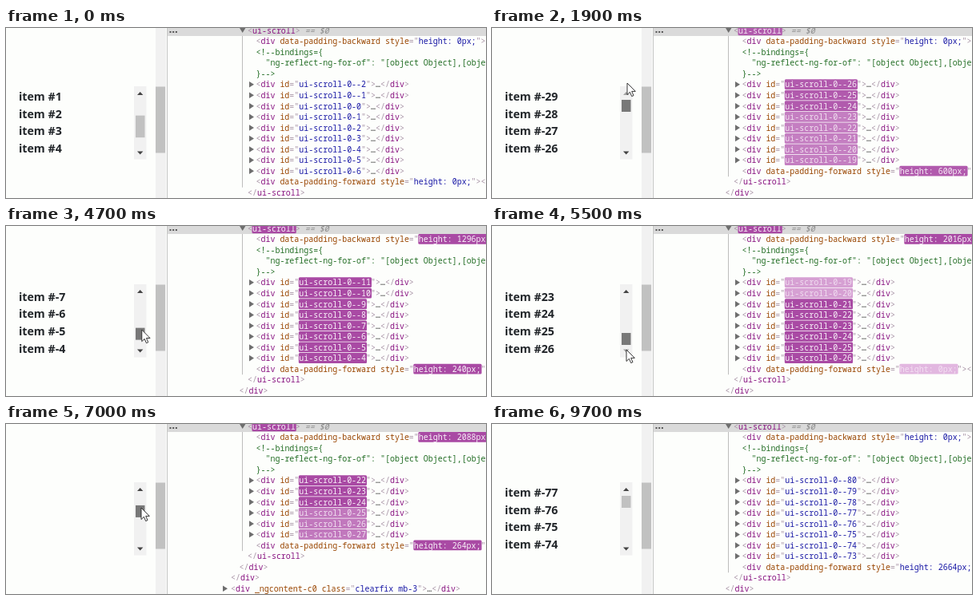
An HTML page for the animation above (10 s loop, 600 by 213 pixels).

```html
<!DOCTYPE html>
<html lang="en">
<head>
<meta charset="utf-8">
<title>Virtual scroll inspector</title>
<style>
  html, body { margin: 0; width: 100%; height: 100%; overflow: hidden; background: #fdfefc; }
  svg { display: block; width: 600px; height: 213px; }
  text { white-space: pre; }
  #items text { font: bold 14.2px "Open Sans", "Noto Sans", sans-serif; fill: #212529; }
  #tree text { font: 9.97px "Noto Sans Mono", "DejaVu Sans Mono", monospace; }
  #tree .hint { font-style: italic; fill: #888; }
</style>
</head>
<body>
<svg viewBox="0 0 600 213" xmlns="http://www.w3.org/2000/svg">
  <rect width="600" height="213" fill="#fdfefc"/>
  <rect x="160" y="73" width="15.5" height="91.5" fill="#f1f1f1"/>
  <rect id="thumb" x="162" width="11.5"/>
  <path id="up" d="M164 84l3.7-4 3.7 4z"/>
  <path id="down" d="M164 154.5h7.4l-3.7 4z"/>
  <g id="items"></g>
  <rect x="187" width="13" height="213" fill="#f1f1f1"/>
  <rect x="187" y="73.5" width="12" height="83" fill="#c1c1c1"/>
  <rect x="201" width="1" height="213" fill="#c4c4c4"/>
  <rect x="202" width="398" height="10" fill="#dadada"/>
  <path d="M204.5 5h10" stroke="#555" stroke-width="2" stroke-dasharray="2 1.7"/>
  <g id="tree"></g>
  <path id="cursor" d="M0 0v14.5l3.4-3.2 2.3 5.3 2.3-1-2.3-5.2h4.6z" fill="#fff" stroke="#222" stroke-width="0.9"/>
</svg>
<script>
const LOOP = 10000, STEP = 100, FADE = 1900;
const CHAR = 5.98, ROW = 13.55, ITEM = 24, VIEW = 4.2;
const TAG = [168, 148, 166], NAME = [136, 18, 128], ATTR = [153, 69, 0],
      VALUE = [26, 26, 166], NOTE = [35, 110, 37], DARK = [48, 48, 48],
      WHITE = [255, 255, 255], HOT = [158, 54, 153], WARM = [245, 219, 244];
const $ = id => document.getElementById(id);
const set = (id, attrs) => Object.entries(attrs).forEach(([k, v]) => $(id).setAttribute(k, v));
const rgb = c => `rgb(${c.map(Math.round)})`;
const mix = (a, b, p) => a.map((v, i) => v + (b[i] - v) * p);
const clamp = v => Math.min(1, Math.max(0, v));
const esc = s => s.replace(/&/g, '&amp;').replace(/</g, '&lt;');

// Evenly spaced steps of the first rendered index, from one value to another.
const sweep = (start, end, from, to, steps, count = 8) =>
  Array.from({ length: steps + 1 }, (_, i) => {
    const p = steps ? i / steps : 0;
    const first = Math.round(from + (to - from) * p);
    return { time: start + (end - start) * p, first, last: first + count - 1 };
  });

const states = [
  sweep(-1e6, -1e6, -2, -2, 0, 9),
  sweep(200, 1650, -4, -23, 4),
  sweep(1800, 3000, -26, -62, 6),
  sweep(3320, 3320, -65, -65, 0),
  sweep(3850, 5050, -60, 13, 6),
  sweep(5450, 6200, 19, 31, 2),
  sweep(6780, 6950, 25, 22, 1, 6),
  sweep(7150, 7500, -38, -77, 3),
  sweep(7780, 7780, -80, -80, 0)
].flat();

// Padding heights, and the moment each row or height last changed.
states.forEach((s, i) => {
  const prev = states[i - 1] || { ...s, min: s.first, max: s.last, born: {} };
  s.down = s.first > prev.first;
  s.min = Math.min(prev.min, s.first);
  s.max = Math.max(prev.max, s.last);
  s.back = (s.first - s.min) * ITEM;
  s.fore = (s.max - s.last) * ITEM;
  s.backTime = s.back === prev.back ? prev.backTime : s.time;
  s.foreTime = s.fore === prev.fore ? prev.foreTime : s.time;
  s.born = {};
  for (let n = s.first; n <= s.last; n++) s.born[n] = prev.born[n] ?? s.time;
});

const stateAt = t => states.findLast(s => s.time <= t);

// time, x, y of the pointer tip
const pointer = [
  [100, 168, 122], [1200, 169, 68], [2600, 169, 70], [3100, 172, 99], [3700, 172, 99],
  [5500, 168, 155], [6700, 168, 140], [7000, 169, 105], [7600, 171, 92], [8000, 197, 78], [8400, 230, -20]
];

// cubic-bezier(0, 0, .2, 1)
function ease(x) {
  let lo = 0, hi = 1;
  for (let i = 0; i < 20; i++) {
    const s = (lo + hi) / 2;
    if (0.6 * (1 - s) * s * s + s * s * s < x) lo = s; else hi = s;
  }
  return 3 * (1 - lo) * lo * lo + lo * lo * lo;
}

function flash(age, color) {
  const p = age / FADE;
  if (p >= 1) return null;
  const out = clamp((p - 0.93) / 0.07);
  const cool = ease(clamp(p / 0.8));
  const bg = mix(HOT, WARM, cool);
  const ink = mix(WHITE, bg, 0.55 * cool);
  return { bg: mix(bg, WHITE, out), ink: mix(ink, color, out) };
}

// parts: [text, color, age of the last change]
function line(row, x, parts) {
  const base = 6.7 + ROW * row;
  let svg = '';
  for (const [str, color, age = Infinity] of parts) {
    const lit = flash(age, color);
    const w = str.length * CHAR;
    if (lit) svg += `<rect x="${x - 0.5}" y="${base - 10.2}" width="${w + 1.5}" height="12.8" rx="1.5" fill="${rgb(lit.bg)}"/>`;
    svg += `<text x="${x}" y="${base}" fill="${rgb(lit ? lit.ink : color)}">${esc(str)}</text>`;
    x += w;
  }
  return svg;
}

const arrow = (x, row) => `<path d="M${x} ${ROW * row - 0.8}v7.6l6-3.8z" fill="#6e6e6e"/>`;
const open = attr => [['<', TAG], ['div', NAME], [' ' + attr, ATTR], ['="', TAG]];
const close = name => [['</', TAG], [name, NAME], ['>', TAG]];
const padding = (side, height, age) => [
  ...open(`data-padding-${side} style`), [`height: ${height}px;`, VALUE, age], ['">', TAG], ...close('div')
];
const folded = (attr, value, age) => [
  ...open(attr), [value, VALUE, age], ['">', TAG], ['…', DARK], ...close('div')
];

function drawTree(t) {
  const s = stateAt(t), X = 312.5;
  let svg = '<path d="M292 0h7.4l-3.7 6z" fill="#6e6e6e"/>';
  svg += line(0, 302, [['<', TAG], ['ui-scroll', NAME, t - s.time], ['>', TAG]]);
  svg += '<text class="hint" x="373.8" y="6.7">== $0</text>';
  svg += line(1, X, padding('backward', s.back, t - s.backTime));
  svg += line(2, X, [['<!--bindings={', NOTE]]);
  svg += line(3, X, [['  "ng-reflect-ng-for-of": "[object Object],[object Object]"', NOTE]]);
  svg += line(4, X, [['}-->', NOTE]]);
  let row = 5;
  for (let n = s.first; n <= s.last; n++, row++)
    svg += arrow(304, row) + line(row, X, folded('id', `ui-scroll-0-${n}`, t - s.born[n]));
  svg += line(row++, X, padding('forward', s.fore, t - s.foreTime));
  svg += `<rect x="295" y="10" width="1" height="${ROW * row - 13.5}" fill="#bdbdbd"/>`;
  svg += line(row++, 302, close('ui-scroll'));
  svg += line(row++, 291.5, close('div'));
  svg += line(row++, 281, close('div'));
  svg += arrow(271, row) + line(row, 281, folded('_ngcontent-c0 class', 'clearfix mb-3'));
  $('tree').innerHTML = svg;
}

// The list runs one step ahead of the inspector.
function drawList(t) {
  const s = stateAt(t + STEP);
  const jumping = t >= 6700 && t <= 7100;
  const top = jumping ? Math.round(35 - 73 * (t - 6700) / 300) : s.first + (s.down ? 4 : 3);
  const y = s.down ? 93.8 : 91;
  let svg = '';
  for (let i = 0; i < 4; i++) {
    const n = top + i;
    if (n >= s.first && n <= s.last) svg += `<text x="16" y="${y + 21.6 * i}">item #${n}</text>`;
  }
  $('items').innerHTML = svg;

  const total = s.max - s.min + 1;
  const height = Math.max(15, 59 * VIEW / total);
  const pinned = s !== states[0] && !s.down && !jumping;
  const ratio = pinned ? 0 : clamp((top - s.min) / (total - VIEW));
  const held = (t >= 100 && t < 3100) || (t >= 3700 && t < 7500);
  const hover = !held && t >= 3100 && t < 3700;
  const fill = held ? '#787878' : hover ? '#a8a8a8' : '#c1c1c1';
  set('thumb', { y: 90 + ratio * (59 - height), height, fill });
  set('up', { fill: held && ratio === 0 ? '#a3a3a3' : '#444' });
  set('down', { fill: ratio === 1 ? '#a3a3a3' : '#444' });
}

function drawCursor(t) {
  const next = pointer.findIndex(k => k[0] > t);
  set('cursor', { visibility: next > 0 ? 'visible' : 'hidden' });
  if (next < 1) return;
  const a = pointer[next - 1], b = pointer[next];
  const [, x, y] = mix(a, b, (t - a[0]) / (b[0] - a[0]));
  set('cursor', { transform: `translate(${x} ${y})` });
}

const start = performance.now();
let shown = -1;
function frame() {
  const time = (performance.now() - start) % LOOP;
  const t = Math.min(9700, Math.floor(time / STEP) * STEP);
  if (t !== shown) {
    drawTree(t);
    drawList(t);
    drawCursor(t);
    shown = t;
  }
  requestAnimationFrame(frame);
}
frame();
</script>
</body>
</html>
```
